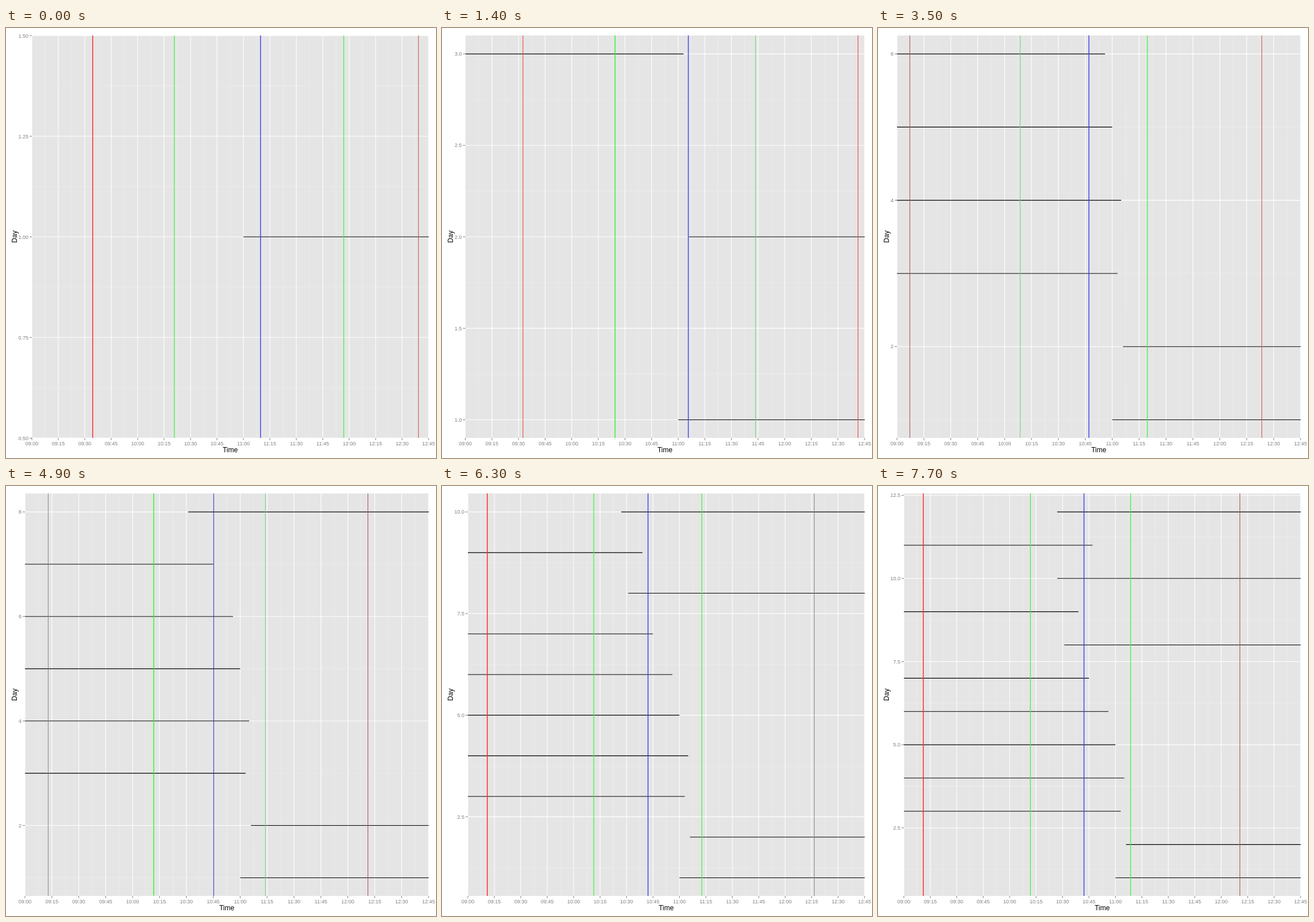
These frames come from a looping animation (748 by 748 pixels, 8000 ms). An HTML page with a canvas:

```html
<!DOCTYPE html>
<html lang="en">
<head>
<meta charset="utf-8">
<title>Day and time chart</title>
<style>
html, body { margin: 0; width: 100%; height: 100%; overflow: hidden; background: #fff; }
canvas { display: block; width: 748px; height: 748px; }
</style>
</head>
<body>
<canvas id="stage" width="748" height="748"></canvas>
<script>
const ctx = document.getElementById('stage').getContext('2d');
const TOP = 13, RIGHT = 735, BOTTOM = 713, SPAN = 225;
const STEP = 700, LOOP = 8000;
const FONT = '"Liberation Sans", Arial, sans-serif';

// Minutes after 09:00 for each day; positive runs right, negative runs left
const bounds = [120, 126, -123, -125, -120, -116, -105, 91, -99, 87, -107, 87];

// Per day: minutes of the five vertical lines and their colour keys
const days = [
  [[34.5, 80.8, 129.7, 176.9, 219.3], 'RgbgD'],
  [[44, 94, 136, 179, 220], 'rgbgr'],
  [[32.5, 84.4, 125.7, 163.6, 221.3], 'rGbhr'],
  [[19.3, 77.6, 117.1, 155.5, 211.8], 'rgbgr'],
  [[12, 73, 112, 147, 208], 'rgbgr'],
  [[7.2, 68.7, 107, 139.6, 203.4], 'dhbgD'],
  [[6.5, 64, 99.5, 130, 191], 'rgbgD'],
  [[12.95, 71.8, 105.2, 134.1, 191.2], 'kGBhd'],
  [[8, 65, 97.5, 126, 188], 'rgbgD'],
  [[11, 71.4, 102.2, 132.7, 196.5], 'Rgbgk'],
  [[8.5, 68, 98.5, 126, 188], 'rgbgD'],
  [[11, 71.8, 102.2, 128.6, 190.6], 'Rgbgd']
];

const inks = {
  R: ['#ff2a2a', 1.5], r: ['#f44b4b', 1.15], D: ['#d45a55', 1.1],
  d: ['#ac5a58', 1.1], k: ['#8c8282', 1], G: ['#22fa22', 1.4],
  g: ['#4df24d', 1.4], h: ['#78d878', 1.15], b: ['#3c3cf2', 1.4],
  B: ['#2828c8', 1.1]
};

function line(x1, y1, x2, y2, color, width) {
  ctx.strokeStyle = color;
  ctx.lineWidth = width;
  ctx.beginPath();
  ctx.moveTo(x1, y1);
  ctx.lineTo(x2, y2);
  ctx.stroke();
}

function label(text, x, y, size, color, align) {
  ctx.font = size + 'px ' + FONT;
  ctx.fillStyle = color;
  ctx.textAlign = align;
  ctx.fillText(text, x, y);
}

// Tick spacing, decimals and left panel edge for a given number of days
function scaleFor(n) {
  if (n <= 2) return { step: 0.25, digits: 2, left: 45 };
  if (n === 3) return { step: 0.5, digits: 1, left: 40.5 };
  if (n <= 5) return { step: 1, digits: 0, left: 33 };
  if (n <= 8) return { step: 2, digits: 0, left: 33 };
  if (n === 11) return { step: 3, digits: 0, left: 33 };
  return { step: 2.5, digits: 1, left: n === 9 ? 40.5 : 45 };
}

function draw(n) {
  const { step, digits, left } = scaleFor(n);
  const pad = n === 1 ? 0.5 : (n - 1) * 0.05;
  const low = 1 - pad, high = n + pad;
  const px = m => left + m / SPAN * (RIGHT - left);
  const py = v => BOTTOM + 0.3 - (v - low) / (high - low) * (BOTTOM - TOP);

  ctx.fillStyle = '#fff';
  ctx.fillRect(0, 0, 748, 748);
  ctx.fillStyle = '#e5e5e5';
  ctx.fillRect(left, TOP, RIGHT - left, BOTTOM - TOP);

  const eachY = (first, fn) => {
    for (let v = first; v <= high + 1e-6; v += step) if (v >= low - 1e-6) fn(v);
  };

  ctx.save();
  ctx.beginPath();
  ctx.rect(left, TOP, RIGHT + 0.7 - left, BOTTOM - TOP);
  ctx.clip();
  eachY(step / 2, v => line(left, py(v), RIGHT, py(v), '#f0f0f0', 0.55));
  for (let m = 7.5; m < SPAN; m += 15) line(px(m), TOP, px(m), BOTTOM, '#f0f0f0', 0.55);
  eachY(0, v => line(left, py(v), RIGHT, py(v), '#fff', 1.1));
  for (let m = 0; m <= SPAN; m += 15) line(px(m), TOP, px(m), BOTTOM, '#fff', 1.1);

  for (let i = 0; i < n; i++) {
    const b = bounds[i], y = py(i + 1);
    line(b > 0 ? px(b) : left, y, b > 0 ? RIGHT + 0.7 : px(-b), y, '#000', 1.1);
  }
  const [marks, keys] = days[n - 1];
  marks.forEach((m, i) => line(px(m), TOP, px(m), BOTTOM, ...inks[keys[i]]));
  ctx.restore();

  const grey = '#7f7f7f';
  eachY(0, v => {
    line(left - 4, py(v), left, py(v), grey, 1);
    label(v.toFixed(digits), left - 6, py(v) + 3.2, 9, grey, 'right');
  });
  for (let m = 0; m <= SPAN; m += 15) {
    line(px(m), BOTTOM, px(m), BOTTOM + 4, grey, 1);
    const hour = String(9 + Math.floor(m / 60)).padStart(2, '0');
    label(hour + ':' + String(m % 60).padStart(2, '0'), px(m), 726.3, 9, grey, 'center');
  }

  label('Time', (left + RIGHT) / 2, 737.6, 12, '#000', 'center');
  ctx.save();
  ctx.translate(18.7, (TOP + BOTTOM) / 2);
  ctx.rotate(-Math.PI / 2);
  label('Day', 0, 0, 12, '#000', 'center');
  ctx.restore();
}

let shown = 0;
const start = performance.now();
function tick(now) {
  const t = Math.max(0, now - start) % LOOP;
  const n = Math.min(days.length, Math.floor(t / STEP) + 1);
  if (n !== shown) draw(shown = n);
  requestAnimationFrame(tick);
}
tick(start);
</script>
</body>
</html>
```
